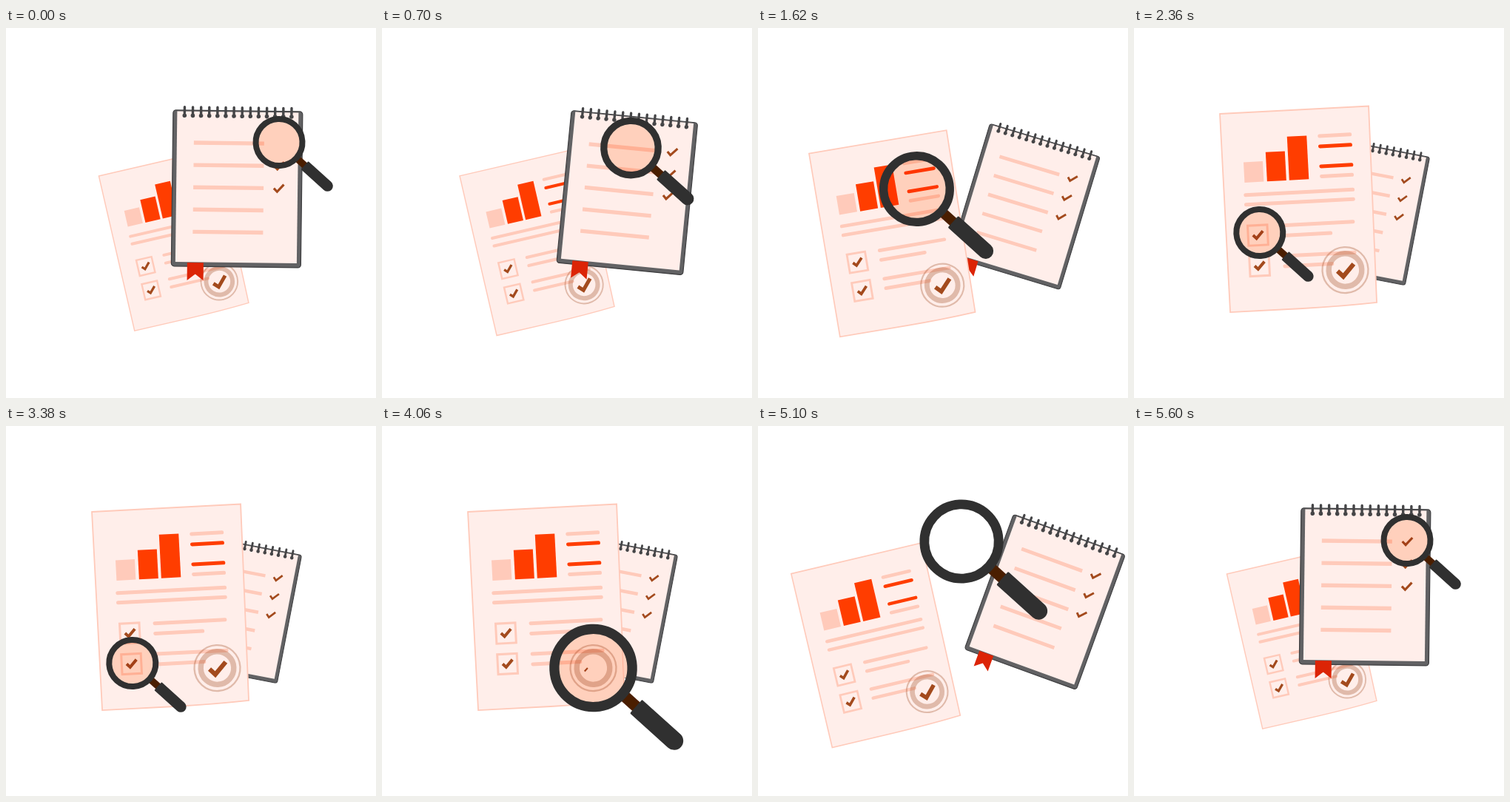
Animation, 500 px wide and 500 px high, one loop 5.62 s. Source, as an HTML page with a canvas:

```html
<!DOCTYPE html>
<html>
<head>
<meta charset="utf-8">
<title>Report review</title>
<style>
html, body { margin: 0; width: 100%; height: 100%; overflow: hidden; background: #fff; }
canvas { display: block; }
</style>
</head>
<body>
<canvas id="stage" width="500" height="500"></canvas>
<script>
const ctx = document.getElementById('stage').getContext('2d');
const LOOP = 5620;
const PAGE = '#ffeeea', PINK = '#ffcaba', ORANGE = '#ff3d00', BROWN = '#a34a1d', DARK = '#303030';

// Easing
const bez = (a, b, t) => 3 * t * (1 - t) ** 2 * a + 3 * t * t * (1 - t) * b + t ** 3;
const smooth = u => u * u * (3 - 2 * u);
function rush(u) {
  let lo = 0, hi = 1;
  for (let i = 0; i < 24; i++) {
    const mid = (lo + hi) / 2;
    if (bez(1, .7, mid) < u) lo = mid; else hi = mid;
  }
  return smooth(lo);
}
const settle = u => 1 - rush(1 - u);

// Poses are x, y, scale, degrees
const paperBack = [227.5, 286.4, .8, -13], paperOut = [159.3, 296.3, .9, -13.3], paperFront = [222.9, 244.6, 1, -3];
const bookFront = [312.1, 217.4, 1, .7], bookOut = [388.5, 238, .918, 20.2], bookBack = [311.2, 247.3, .835, 10.9];
const glassHome = [369, 154.5, 1, 42], glassBox1 = [169.8, 276.5, 1, 42], glassBox2 = [170.8, 320.5, 1, 42];
const glassStamp = [285.5, 327, 1.67, 42];

// Tracks: [time, pose, easing towards this pose]
const swap = (start, out, middle) => [
  [600, start], [1200, out, settle], [1800, middle, rush],
  [4400, middle], [5000, out, settle], [5600, start, rush]
];
const paperTrack = swap(paperBack, paperOut, paperFront);
const bookTrack = swap(bookFront, bookOut, bookBack);
const glassTrack = [
  [600, glassHome], [1200, [239.5, 184.5, 1.66, 42], settle], [1800, glassBox1, rush],
  [2400, glassBox1], [3000, glassBox2, smooth],
  [3400, glassBox2], [4000, glassStamp, settle],
  [4400, glassStamp], [5000, [274, 156, 1.6, 42], settle], [5600, glassHome, rush]
];

function poseAt(track, t) {
  const next = track.findIndex(k => k[0] > t);
  if (next < 0) return track[track.length - 1][1];
  if (next === 0) return track[0][1];
  const [t0, from] = track[next - 1], [t1, to, ease] = track[next];
  const p = ease ? ease((t - t0) / (t1 - t0)) : 0;
  return from.map((v, i) => v + (to[i] - v) * p);
}

const drawn = (t, start, end) => t >= start && t < end ? smooth((t - start) / (end - start)) : 1;

// Drawing helpers
function place([x, y, s, deg]) {
  ctx.translate(x, y);
  ctx.rotate(deg * Math.PI / 180);
  ctx.scale(s, s);
}
function rect(x, y, w, h, color) {
  ctx.fillStyle = color;
  ctx.fillRect(x, y, w, h);
}
function line(x0, x1, y, color = PINK, cap = 'round', width = 5) {
  ctx.strokeStyle = color;
  ctx.lineWidth = width;
  ctx.lineCap = cap;
  ctx.beginPath();
  ctx.moveTo(x0, y);
  ctx.lineTo(x1, y);
  ctx.stroke();
}
function ring(x, y, r, width, color) {
  ctx.strokeStyle = color;
  ctx.lineWidth = width;
  ctx.beginPath();
  ctx.arc(x, y, r, 0, 7);
  ctx.stroke();
}
function check(x, y, size, width, p) {
  if (p <= 0) return;
  ctx.save();
  ctx.translate(x, y);
  ctx.scale(size, size);
  ctx.strokeStyle = BROWN;
  ctx.lineWidth = width;
  ctx.lineCap = 'butt';
  if (p < 1) ctx.setLineDash([20.3 * p, 50]);
  ctx.beginPath();
  ctx.moveTo(-6.5, 0);
  ctx.lineTo(-2, 4.6);
  ctx.lineTo(7, -5.2);
  ctx.stroke();
  ctx.restore();
}
// Fills the part of a sheet that lies under the lens
function fillLens(outline, glass, color, mode) {
  ctx.save();
  ctx.clip(outline);
  ctx.setTransform(1, 0, 0, 1, 0, 0);
  ctx.globalCompositeOperation = mode;
  ctx.fillStyle = color;
  ctx.beginPath();
  ctx.arc(glass[0], glass[1], 29 * glass[2], 0, 7);
  ctx.fill();
  ctx.restore();
}

const paperShape = new Path2D('M0 0H201.3L198.4 265.7Q150 268.5 98 268.5L0 268.4Z');
const coverShape = new Path2D();
coverShape.roundRect(-87.5, -105.5, 175, 211, 4);
const ribbon = new Path2D('M-66 100.4h22v24l-11-8.5-11 8.5z');

function drawPaper(t, glass) {
  ctx.save();
  place(poseAt(paperTrack, t));
  ctx.translate(-100, -134);
  ctx.fillStyle = PAGE;
  ctx.fill(paperShape);
  ctx.strokeStyle = PINK;
  ctx.lineWidth = 1.8;
  ctx.stroke(paperShape);

  rect(28.5, 67, 26, 27.5, PINK);
  rect(59, 55, 26, 39.5, ORANGE);
  rect(89, 35.5, 26.5, 59, ORANGE);
  line(133, 174, 37);
  line(133, 174, 51, ORANGE);
  line(133, 174, 78, ORANGE);
  line(133, 174, 91.5);
  line(29, 174, 111.5);
  line(29, 174, 124.5);

  [[151.5, 1800, 2400], [193, 3000, 3400]].forEach(([y, start, end]) => {
    ctx.strokeStyle = PINK;
    ctx.lineWidth = 3;
    ctx.strokeRect(29.5, y + 1.5, 26.5, 27);
    check(42.7, y + 14.7, 1, 4, drawn(t, start, end));
    line(77, 172, y + 3.4);
    line(77, 141, y + 17.2);
  });

  ring(158.2, 219.6, 31, 2.3, 'rgba(160,75,35,.32)');
  ring(158.2, 219.6, 22.3, 7.4, 'rgba(160,75,35,.32)');
  check(158.4, 220.6, 1.65, 3.7, drawn(t, 4000, 4400));
  fillLens(paperShape, glass, '#ffdfcd', 'multiply');
  ctx.restore();
}

function drawBook(t, glass) {
  ctx.save();
  place(poseAt(bookTrack, t));
  ctx.fillStyle = '#626264';
  ctx.fill(coverShape);
  ctx.strokeStyle = '#3c3c3e';
  ctx.lineWidth = 1.2;
  ctx.stroke(coverShape);
  fillLens(coverShape, glass, PAGE, 'source-over');
  rect(-82, -104, 164, 203.5, PAGE);
  ctx.fillStyle = '#dc2406';
  ctx.fill(ribbon);

  for (let i = 0; i < 5; i++) line(-59, 36, -61.7 + 30.1 * i, PINK, 'butt', 5.4);
  for (let i = 0; i < 3; i++) check(56.3, -62 + 30.3 * i, 1, 3.2, i ? 1 : drawn(t, 0, 600));
  ctx.fillStyle = '#454547';
  for (let i = 0; i < 14; i++) {
    const x = -72 + 11.12 * i;
    ctx.beginPath();
    ctx.roundRect(x - 1.7, -111.5, 3.4, 12, 1.7);
    ctx.arc(x, -98.3, 2.8, 0, 7);
    ctx.fill();
  }
  fillLens(coverShape, glass, '#ffdfcd', 'multiply');
  ctx.restore();
}

function drawGlass(pose) {
  ctx.save();
  place(pose);
  rect(34, -4.7, 15, 9.4, '#4a1e00');
  ring(0, 0, 31.5, 8, DARK);
  ctx.fillStyle = DARK;
  ctx.beginPath();
  ctx.roundRect(46.5, -7.4, 49, 14.8, [1, 7.4, 7.4, 1]);
  ctx.fill();
  ctx.restore();
}

function draw(t) {
  const glass = poseAt(glassTrack, t);
  rect(0, 0, 500, 500, '#fff');
  const sheets = [drawPaper, drawBook];
  if (t >= 1200 && t < 5000) sheets.reverse();
  sheets.forEach(sheet => sheet(t, glass));
  drawGlass(glass);
}

const begin = performance.now();
function tick() {
  draw((performance.now() - begin) % LOOP);
  requestAnimationFrame(tick);
}
tick();
</script>
</body>
</html>
```
